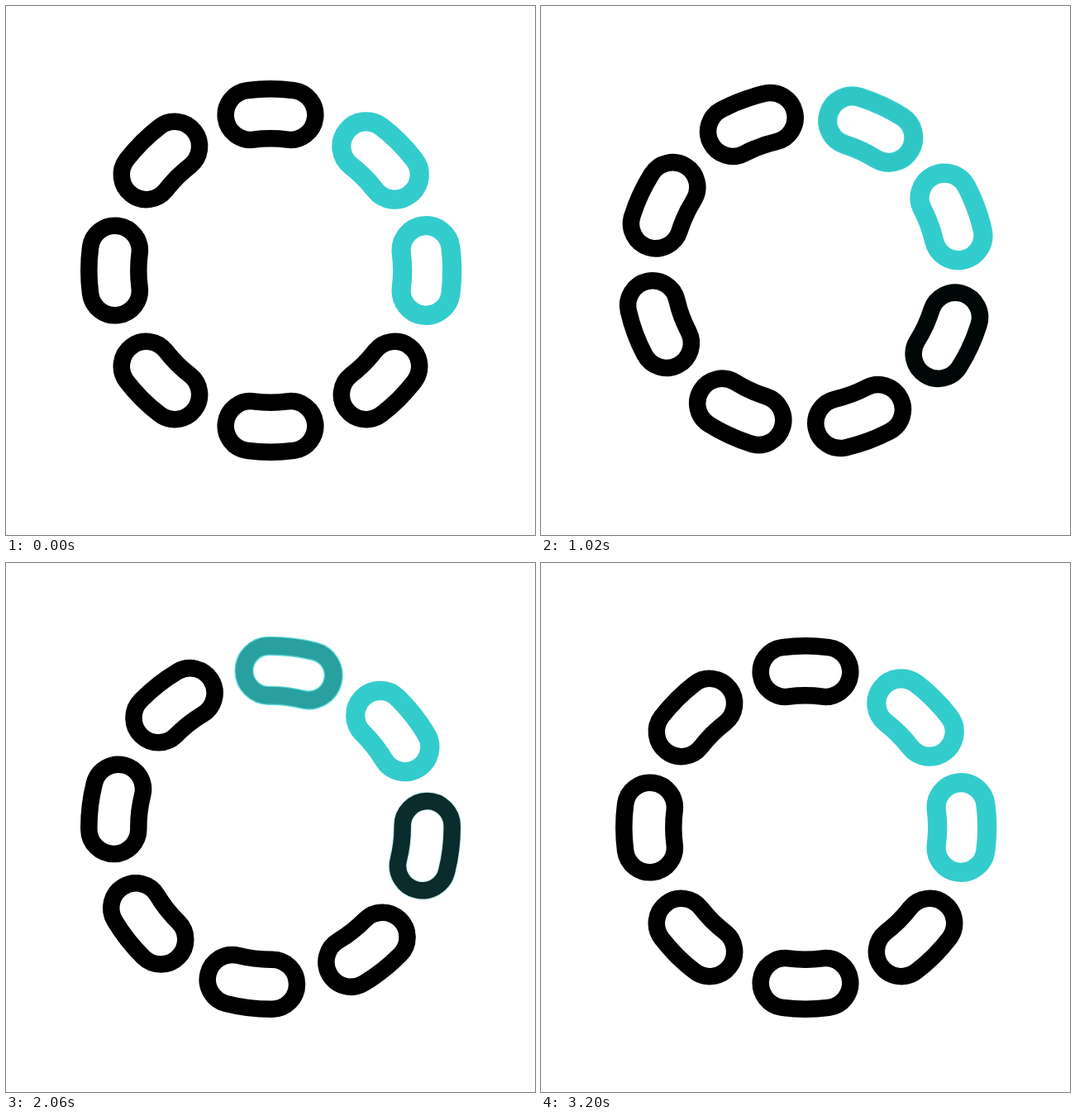
These frames come from a looping animation (640x640 px, 3.22 s). An HTML page:

```html
<!DOCTYPE html>
<html lang="en">
<head>
<meta charset="utf-8">
<title>Loading ring</title>
<style>
  html, body { margin: 0; width: 100%; height: 100%; overflow: hidden; background: #fff; }
  svg { display: block; width: 100%; height: 100%; }
  path { fill: none; }
  .base { stroke: #000; stroke-width: 20.5; }
  .glow { stroke: #33cccc; stroke-width: 23.2; }
</style>
</head>
<body>
<svg viewBox="0 0 640 640"><g id="ring"></g></svg>
<script>
const LOOP = 3220, TURN = 3200, TICK = 20, STEP = 200;
const COUNT = 8, CENTER = 320;
const RADIUS = 189.7, CAP = 30, HALF_ANGLE = 7.36 * Math.PI / 180;
const ring = document.getElementById('ring');

// A ring segment with round ends, centred at the top of the ring.
function linkPath() {
  const outer = RADIUS + CAP, inner = RADIUS - CAP;
  const at = (r, a) =>
    `${(CENTER + r * Math.sin(a)).toFixed(2)} ${(CENTER - r * Math.cos(a)).toFixed(2)}`;
  const arc = (r, sweep, end) => `A${r} ${r} 0 0 ${sweep} ${end}`;
  return 'M' + at(outer, -HALF_ANGLE)
    + arc(outer, 1, at(outer, HALF_ANGLE))
    + arc(CAP, 1, at(inner, HALF_ANGLE))
    + arc(inner, 0, at(inner, -HALF_ANGLE))
    + arc(CAP, 1, at(outer, -HALF_ANGLE)) + 'Z';
}

function addLink(className, index) {
  const path = document.createElementNS('http://www.w3.org/2000/svg', 'path');
  path.setAttribute('class', className);
  path.setAttribute('d', linkPath());
  path.setAttribute('transform', `rotate(${index * 360 / COUNT} ${CENTER} ${CENTER})`);
  return ring.appendChild(path);
}

const glows = Array.from({ length: COUNT }, (_, i) => {
  addLink('base', i);
  return addLink('glow', i);
});

const ease = p => p * p * (3 - 2 * p);

function draw(time) {
  const t = Math.floor((time % LOOP) / TICK) * TICK;
  ring.setAttribute('transform', `rotate(${t / TURN * 360} ${CENTER} ${CENTER})`);

  // One link fades out, one stays lit and the next fades in.
  const step = Math.floor(t / STEP);
  const fade = ease(t / STEP - step);
  const levels = [1 - fade, 1, fade];
  glows.forEach((glow, i) => {
    const place = (i - step - 1 + COUNT * 4) % COUNT;
    glow.setAttribute('opacity', levels[place] || 0);
  });
}

let start;
function frame(now) {
  start ??= now;
  draw(now - start);
  requestAnimationFrame(frame);
}
draw(0);
requestAnimationFrame(frame);
</script>
</body>
</html>
```
